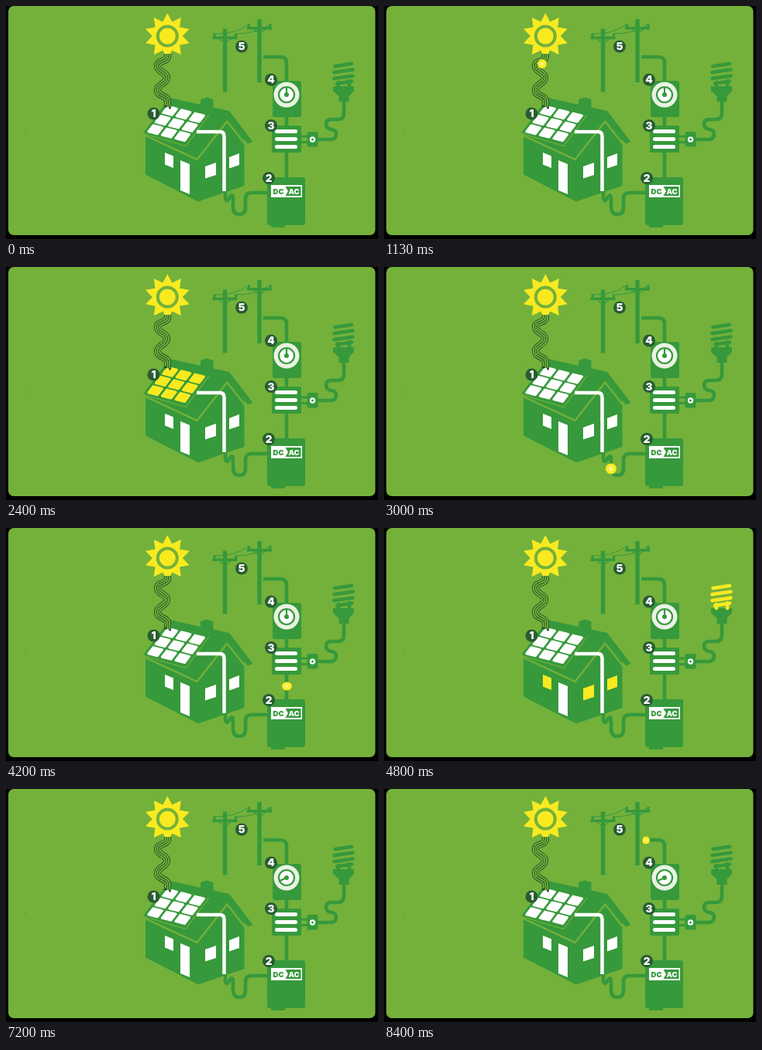
These frames come from a looping animation (480x302 px, 8990 ms). An HTML page:

```html
<!DOCTYPE html>
<html lang="en">
<head>
<meta charset="utf-8">
<title>Solar power at home</title>
<style>
  html, body { margin: 0; height: 100%; overflow: hidden; background: #000; }
  svg { display: block; width: 480px; height: 302px; --lime: #73b13b; --leaf: #36993b; --sun: #f9ea20; --lamp: var(--leaf); --pane: #fff; --panel: #fff; }
  text { font-family: Inter, "Liberation Sans", sans-serif; font-weight: 900; text-anchor: middle; fill: #fff; }
  .leaf { fill: var(--leaf); }
  .line { fill: none; stroke: var(--leaf); stroke-width: 4.6; }
  .wave { fill: none; stroke: #214f25; }
  .pane { fill: var(--pane); }
</style>
</head>
<body>
<svg viewBox="0 0 480 302">
  <defs>
    <radialGradient id="glow">
      <stop offset="0" stop-color="#fffbc0"/>
      <stop offset=".45" stop-color="#fbee3a"/>
      <stop offset="1" stop-color="#f6e716"/>
    </radialGradient>
    <path id="ray" d="M208.500 62V65C208.500 73 195.500 70 195.500 78S207.500 85 207.500 93S195.500 101 195.500 109C195.500 118 208.500 115 208.500 124V131"/>
  </defs>
  <rect x="3" y="0" width="473.500" height="297" rx="7" fill="#73b13b"/>
  <circle cx="25" cy="162" r=".8" fill="#4d8a30"/>

  <!-- sun -->
  <polygon id="sun" fill="#f9ea20"/>
  <circle cx="208.300" cy="39" r="12.500" fill="none" stroke="#73b13b" stroke-width="4"/>

  <!-- utility poles -->
  <g class="leaf">
    <path id="pole" d="M324.300 17H329.700V99H324.300ZM311 27H343V30.500H311ZM312 23H315V28H312ZM339.500 23H342.500V28H339.500ZM318 30L325 35.500V34L320 30ZM336 30L329 35.500V34L334 30Z"/>
    <use href="#pole" x="-44.500" y="12.500"/>
  </g>
  <path class="line" style="stroke-width:1" d="M269 36Q294 37 313 24M296 36Q322 36 341 24"/>

  <!-- house -->
  <path class="leaf" d="M180 165L247 195L286 145L307.500 173V233L248 253.500L180 218.500ZM251 121L259 118.500L267.500 121V138H251Z"/>
  <path d="M178 167L246.500 199L285.300 149.500L308 178.500" fill="none" stroke="#73b13b" stroke-width="2.300"/>
  <path class="leaf" d="M211 119L288 136L318.500 176L312 178.500L286 145L247 196L177.500 164Z"/>
  <path d="M180 166L232 181.500L262 141" fill="none" stroke="#73b13b" stroke-width="1.200"/>
  <g id="panels" fill="var(--panel)" stroke="var(--panel)" stroke-width="3" stroke-linejoin="round"></g>
  <path d="M225 200L237 205V244L225 239Z" fill="#fff"/>
  <path class="pane" d="M205 190L216 194.500V210L205 205.500ZM257 208L271 203V219L257 223.500ZM288 196L301 191V206L288 210.500Z"/>
  <path class="line" d="M283 240V249Q285 255 288 249Q293 241 293 250V260Q293 270 301 270Q309 270 309 261V250Q309 242 317 242H340"/>
  <path d="M246 163H276Q281.500 163 281.500 169V240" fill="none" stroke="#fff" stroke-width="4.500"/>

  <!-- sun rays -->
  <g class="wave">
    <use href="#ray" stroke-width="9.200"/>
    <use href="#ray" stroke="#73b13b" stroke-width="7.400"/>
    <use href="#ray" stroke-width="3.600"/>
    <use href="#ray" stroke="#73b13b" stroke-width="1.800"/>
  </g>
  <g fill="#214f25"><circle cx="206" cy="130" r="1.500"/><circle cx="211.500" cy="132" r="1.500"/></g>

  <!-- inverter, fuse box, meter and wiring -->
  <path class="line" d="M362 222V189M362 156V143M362 98V74Q362 66 354 66H332"/>
  <g class="leaf">
    <rect x="337" y="222" width="49" height="62" rx="3"/>
    <rect x="342" y="282" width="18" height="5" rx="1.500"/>
    <rect x="343" y="155" width="38" height="35" rx="2"/>
    <rect x="344" y="97" width="37" height="47" rx="3"/>
    <path d="M381 167.500H389V170.500H381ZM381 175H389V178H381Z"/>
    <rect x="388.500" y="163" width="14" height="19.500" rx="2"/>
  </g>
  <rect x="342" y="232" width="40" height="16" fill="#fff"/>
  <path class="leaf" d="M360.500 234H380.500V246H360.500L364 240Z"/>
  <text x="351.500" y="243.500" font-size="9.500" style="fill:var(--leaf)">DC</text>
  <text x="371.500" y="243.500" font-size="9.500">AC</text>
  <path d="M349.500 162.500H373.500M349.500 172.500H373.500M349.500 182.500H373.500" stroke="#fff" stroke-width="5" stroke-linecap="round"/>
  <circle cx="395.500" cy="173" r="3.700" fill="#fff"/>
  <circle class="leaf" cx="395.500" cy="173" r="1.500"/>
  <circle cx="362" cy="115" r="16.500" fill="#e9f2e2"/>
  <circle class="line" cx="362" cy="115" r="10" style="fill:#fff;stroke-width:2.200"/>
  <circle class="leaf" cx="362" cy="115" r="3"/>
  <path id="needle" class="line" style="stroke-width:2.200" d="M362 115V106"/>

  <!-- lamp -->
  <path class="line" d="M402 173H418Q426 173 426 166Q426 161 420 160Q413 159 413 153Q413 147 420 147H428Q436 147 436 139V122"/>
  <path class="leaf" d="M422 104H449V110L442.500 117V124H429.500V117L422 110Z"/>
  <path d="M424.500 78L446 74.800M423.500 86L447.500 82.500M423.500 94L447.500 90.500M427 100.500L446 97.500M429 99V104M443 97V104" fill="none" stroke="var(--lamp)" stroke-width="4.600" stroke-linecap="round"/>

  <g id="badges"></g>
  <ellipse id="spark" fill="url(#glow)"/>
</svg>
<script>
const $ = id => document.getElementById(id);
const svg = document.querySelector('svg');
const LOOP = 8990, STEP = 600;

$('sun').setAttribute('points', Array.from({ length: 20 }, (_, i) => {
  const a = i * Math.PI / 10, r = i % 2 ? 19.5 : 29.8;
  return [208.3 + r * Math.sin(a), 39 - r * Math.cos(a)].map(v => v.toFixed(1));
}).join(' '));

// Three by three rounded cells on the slanted roof.
let cells = '';
for (let row = 0; row < 3; row++) {
  for (let col = 0; col < 3; col++) {
    const corner = (u, v) => {
      const across = col + u, down = row + v;
      return `${207.5 + 17.5 * across - 9.4 * down} ${127.5 + 4.4 * across + 12.2 * down}`;
    };
    cells += `<path d="M${corner(.17, .17)}L${corner(.83, .17)}L${corner(.83, .83)}L${corner(.17, .83)}Z"/>`;
  }
}
$('panels').innerHTML = cells;

$('badges').innerHTML = [[190.5, 139.5], [339, 223], [342, 155], [342, 95.5], [304, 52.5]].map(([x, y], i) =>
  `<circle cx="${x}" cy="${y}" r="8" fill="#285c31"/><text x="${x}" y="${y + 4.8}" font-size="13.5">${i + 1}</text>`).join('');

// Spark by step: x, y, horizontal and vertical radius.
const sparks = {
  1: [204, 75, 6, 6], 2: [206, 87, 6, 6], 3: [200, 113.5, 6, 6],
  5: [293, 261.5, 7, 7], 6: [319, 242, 5, 6], 7: [362.5, 205, 6.5, 5.5],
  9: [362, 149, 5, 4.5], 13: [362, 83.5, 6, 6], 14: [338, 66.5, 5, 5]
};
const needleTurns = { 10: -45, 11: -80 };

function draw(now) {
  const step = Math.floor(now % LOOP / STEP);
  const [x, y, rx, ry] = sparks[step] || [0, 0, 0, 0];
  Object.entries({ cx: x, cy: y, rx, ry }).forEach(([key, value]) => $('spark').setAttribute(key, value));
  const turn = step < 10 ? 0 : needleTurns[step] ?? -115;
  $('needle').setAttribute('transform', `rotate(${turn} 362 115)`);
  svg.style.setProperty('--panel', step === 4 ? 'var(--sun)' : '#fff');
  svg.style.setProperty('--pane', step === 8 ? 'var(--sun)' : '#fff');
  svg.style.setProperty('--lamp', step === 8 ? 'var(--sun)' : 'var(--leaf)');
}

const start = performance.now();
(function tick() {
  draw(performance.now() - start);
  requestAnimationFrame(tick);
})();
</script>
</body>
</html>
```
